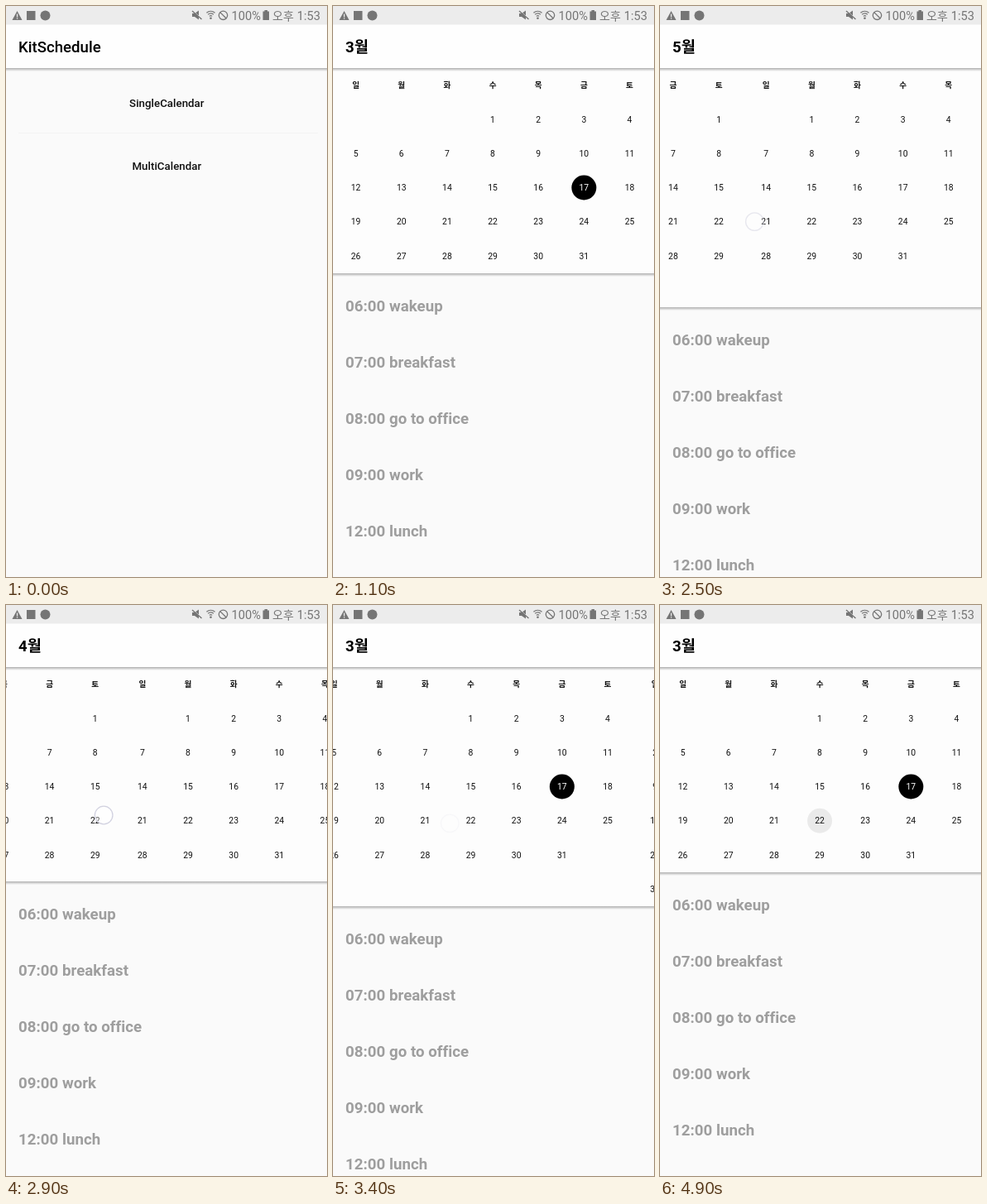
Animation of 388x690 px, one loop 5000 ms. Source, as an HTML page with a canvas:

```html
<!DOCTYPE html>
<html lang="ko">
<head>
<meta charset="utf-8">
<title>Calendar demo</title>
<style>
  html, body { margin: 0; width: 100%; height: 100%; overflow: hidden; background: #fafafa; }
  canvas { display: block; }
</style>
</head>
<body>
<canvas id="stage" width="388" height="690"></canvas>
<script>
const ctx = document.getElementById('stage').getContext('2d');
const W = 388, H = 690, LOOP = 5000, STEP = 100;
const COL = 55.15, ROW = 41.25, PANEL_TOP = 76, PANEL_BOTTOM = 324;
const HEIGHT_LAG = 400; // the panel follows the pager this much later
const FAMILY = 'Roboto, "Noto Sans CJK KR", "Noto Sans CJK", sans-serif';
const WEEKDAYS = [...'일월화수목금토'];
const EVENTS = ['06:00 wakeup', '07:00 breakfast', '08:00 go to office', '09:00 work', '12:00 lunch'];
const YEAR = 2017, FIRST_MONTH = 3, SELECTED = 17, PRESSED = 22;

// dir +1 turns to the next month, -1 to the previous one
const SWIPES = [
  { start: 1100, end: 1350, dir: -1 },
  { start: 1400, end: 1650, dir: 1 },
  { start: 1720, end: 2100, dir: 1 },
  { start: 2350, end: 2575, dir: 1 },
  { start: 2833, end: 3000, dir: -1 },
  { start: 3000, end: 3476, dir: -1 }
];

const clamp = v => Math.max(0, Math.min(1, v));
const mix = (a, b, k) => a + (b - a) * k;
const smooth = v => (v = clamp(v)) * v * (3 - 2 * v);
const progress = (swipe, t) => (t - swipe.start) / (swipe.end - swipe.start);

const sumSwipes = share => SWIPES.reduce((sum, s) => sum + s.dir * share(s), FIRST_MONTH);
const pageAt = t => sumSwipes(s => smooth(progress(s, t)));
const titleMonth = t => sumSwipes(s => progress(s, t) > .3 ? 1 : 0);
// only April needs a sixth row
const extraRow = t => clamp(1 - Math.abs(pageAt(t - HEIGHT_LAG) - 4));

function text(str, x, y, size, weight = 400, color = '#111', align = 'left') {
  ctx.font = `${weight} ${size}px ${FAMILY}`;
  ctx.fillStyle = color;
  ctx.textAlign = align;
  ctx.fillText(str, x, y);
}

function rect(x, y, w, h, color) {
  ctx.fillStyle = color;
  ctx.fillRect(x, y, w, h);
}

function disc(x, y, r, color) {
  ctx.fillStyle = color;
  ctx.beginPath();
  ctx.arc(x, y, r, 0, 7);
  ctx.fill();
}

function poly(points, color) {
  ctx.fillStyle = color;
  ctx.beginPath();
  points.forEach(([x, y]) => ctx.lineTo(x, y));
  ctx.fill();
}

function line(x0, y0, x1, y1, color, width) {
  ctx.strokeStyle = color;
  ctx.lineWidth = width;
  ctx.beginPath();
  ctx.moveTo(x0, y0);
  ctx.lineTo(x1, y1);
  ctx.stroke();
}

function arc(x, y, r, from, to, color, width) {
  ctx.strokeStyle = color;
  ctx.lineWidth = width;
  ctx.beginPath();
  ctx.arc(x, y, r, from, to);
  ctx.stroke();
}

function shadow(y) {
  const fade = ctx.createLinearGradient(0, y, 0, y + 4);
  fade.addColorStop(0, 'rgba(0,0,0,.3)');
  fade.addColorStop(1, 'rgba(0,0,0,0)');
  rect(0, y, W, 4, fade);
}

function statusBar() {
  const gray = '#757575', bg = '#ececec';
  rect(0, 0, W, 22.5, bg);
  poly([[13.5, 6], [19.5, 17], [7.5, 17]], gray);
  rect(12.9, 9.5, 1.3, 4, bg);
  rect(12.9, 14.4, 1.3, 1.3, bg);
  rect(25, 6, 10.5, 11, gray);
  disc(47.5, 11.5, 6, gray);
  poly([[225, 9], [228, 9], [233, 5.5], [233, 16.5], [228, 13], [225, 13]], gray);
  line(226, 6, 237, 15.5, bg, 1);
  line(225, 6, 236.5, 16, gray, 1.4);
  for (const r of [2.7, 5.4, 8.1]) arc(247.5, 14.5, r, -2.25, -.9, gray, 1.2);
  disc(247.5, 14.8, 1.3, gray);
  arc(262.5, 11.3, 5.2, 0, 7, gray, 1.3);
  line(258.8, 7.6, 266.2, 15, gray, 1.3);
  text('100%', 272.5, 16.7, 14.6, 400, gray);
  rect(310.5, 6.5, 7.5, 10.5, gray);
  rect(312.5, 5, 3.5, 2, gray);
  text('오후', 322, 16.5, 14, 400, gray);
  text('1:53', 380, 16.7, 14.6, 400, gray, 'right');
}

function appBar(title, weight) {
  rect(0, 22, W, 53, '#fefefe');
  shadow(75);
  text(title, 15, 56, 18.6, weight, '#000');
}

function menu() {
  rect(0, 0, W, H, '#fafafa');
  text('SingleCalendar', 194.3, 122, 13.3, 500, '#111', 'center');
  rect(15, 153, 362, 1, '#f3f3f3');
  text('MultiCalendar', 194.3, 198, 13.3, 500, '#111', 'center');
  appBar('KitSchedule', 500);
}

function month(number, left, ripple) {
  const first = new Date(YEAR, number - 1, 1).getDay();
  const days = new Date(YEAR, number, 0).getDate();
  const colX = i => left + 27.6 + i * COL;
  WEEKDAYS.forEach((name, i) => text(name, colX(i), 99, 9.6, 700, '#111', 'center'));
  for (let day = 1; day <= days; day++) {
    const cell = first + day - 1;
    const x = colX(cell % 7), y = 136.8 + Math.floor(cell / 7) * ROW;
    const current = number === FIRST_MONTH, chosen = current && day === SELECTED;
    if (chosen) disc(x, y + .2, 15, '#000');
    if (current && day === PRESSED) disc(x, y + .2, 15, `rgba(0,0,0,${.075 * ripple})`);
    text(day, x, y + 3.8, 10.4, 400, chosen ? '#fff' : '#111', 'center');
  }
}

function calendar(t) {
  const page = pageAt(t), grow = Math.round(ROW * extraRow(t));
  const height = PANEL_BOTTOM + grow - PANEL_TOP;
  rect(0, 0, W, H, '#fafafa');
  EVENTS.forEach((name, i) => text(name, 15, 369 + grow + i * 68, 18.7, 700, '#9e9e9e'));
  rect(0, PANEL_TOP, W, height, '#fdfdfd');
  shadow(PANEL_TOP + height - 1);
  ctx.save();
  ctx.beginPath();
  ctx.rect(0, PANEL_TOP, W, height);
  ctx.clip();
  for (let n = Math.floor(page); n <= Math.ceil(page); n++) {
    month(n, (n - page) * W, clamp((t - 4600) / 300));
  }
  ctx.restore();
  appBar(titleMonth(t) + '월', 700);
}

function finger(x, y, alpha = 1) {
  ctx.globalAlpha = clamp(alpha);
  disc(x, y, 10.8, 'rgba(255,255,255,.35)');
  arc(x, y, 10.8, 0, 7, '#d2d2e0', 1.3);
  ctx.globalAlpha = 1;
}

function fingers(t) {
  if (t >= 100 && t < 400) finger(204, 103);
  for (const swipe of SWIPES) {
    const k = smooth(progress(swipe, t));
    if (k > 0 && k < 1) finger(124 + swipe.dir * (20 - 40 * k), 248 + 17 * k, 2 * (1 - k));
  }
  if (t >= 3600 && t < 4700) {
    const k = smooth((t - 4200) / 400);
    finger(mix(143, 190, k), mix(228, 262, k));
  }
}

function draw(t) {
  const opened = clamp((t - 400) / 300);
  if (opened < 1) menu();
  if (opened > 0) {
    ctx.globalAlpha = opened;
    calendar(t);
    ctx.globalAlpha = 1;
  }
  statusBar();
  fingers(t);
}

ctx.letterSpacing = '0.02px'; // keeps "ffi" as separate letters
const begin = performance.now();
function tick() {
  // the screen advances ten times a second; lead slightly to absorb timer jitter
  const t = (performance.now() - begin + 16) % LOOP;
  draw(Math.floor(t / STEP) * STEP);
  requestAnimationFrame(tick);
}
tick();
</script>
</body>
</html>
```
